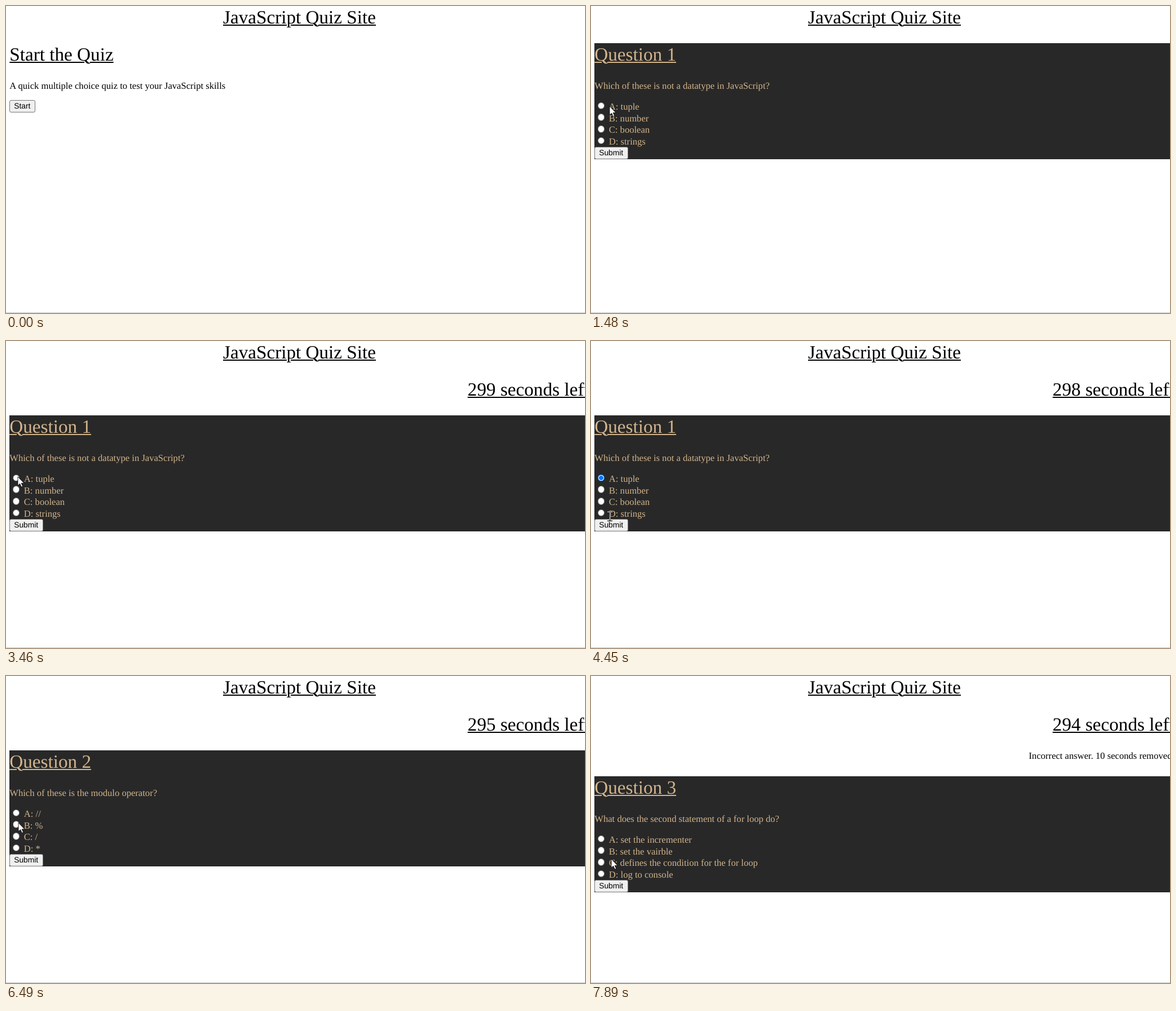
Animation of 1027 by 545 pixels, one loop 8 s. Source, as an HTML page:

```html
<!DOCTYPE html>
<html lang="en">
<head>
<meta charset="utf-8">
<title>JavaScript Quiz Site</title>
<style>
  html, body { margin: 0; width: 100%; height: 100%; overflow: hidden; background: #fff; }
  #stage { position: relative; width: 1027px; height: 545px; overflow: hidden; background: #fff; isolation: isolate; }
  #stage * { position: absolute; box-sizing: border-box; }
  #edge { left: 0; top: 544px; width: 100%; height: 1px; background: #c8c8c8; }
  .text { white-space: pre; color: #000; text-rendering: geometricPrecision; }
  .heading { font: 33.2px/36px "Liberation Serif", "Times New Roman", serif;
    text-decoration: underline 2px; text-underline-offset: 2px; }
  .body { font: 16.6px/19px "Liberation Serif", "Times New Roman", serif; }
  .label { font: 13.8px/15px "Liberation Sans", Arial, sans-serif; }
  .panel { left: 6px; width: 1021px; height: 206px; background: #282828; }
  .tan { color: #d2b48c; }
  .button { left: 6px; height: 22px; border: 1px solid #767676; border-radius: 3px; background: #efefef; }
  .button.hover { background: #e5e5e5; border-color: #4f4f4f; }
  .button.active { background: #f5f5f5; border-color: #8d8d8d; }
  .radio { --blue: #0075ff; left: 11.6px; width: 12.8px; height: 12.8px; border: 1px solid #767676; border-radius: 50%; background: #fff; }
  .radio.hover { --blue: #005cc8; border-color: #4f4f4f; }
  .radio.checked { border: 1.5px solid var(--blue); background: radial-gradient(circle, var(--blue) 3.6px, #fff 4.2px); }
  #glow { left: -12.5px; top: -12.5px; width: 25px; height: 25px; border-radius: 50%; background: rgba(250, 240, 0, .58); }
  #pointer { left: 0; top: 0; overflow: visible; }
</style>
</head>
<body>
<div id="stage">
  <div id="page"></div>
  <div id="edge"></div>
  <div id="glow"></div>
  <svg id="pointer" width="1" height="1">
    <path id="arrow" d="M0 0V15.5L3.6 12.2 6.3 18 8.7 17 6.2 11.4H11Z" fill="#fff" stroke="#000" stroke-width=".8"/>
    <path id="beam" d="M-4.5 -8H4.5M0 -8V8M-4.5 8H4.5" fill="none" stroke="#fff" stroke-width="1.4"/>
  </svg>
</div>
<script>
const LOOP = 8000, STEP = 66, PRESS = 130, SECOND = 1004;
const TIMER_START = 2470, ENTER = 260;
const HEAD = 66, ROW = 20.7;
const $ = id => document.getElementById(id);

// moments at which the mouse button is let go
const clicks = { start: 1480, pickOne: 3850, sendOne: 5060, pickTwo: 6820, sendTwo: 7890 };

const intro = { title: 'Start the Quiz', text: 'A quick multiple choice quiz to test your JavaScript skills', options: [] };
const first = { title: 'Question 1', text: 'Which of these is not a datatype in JavaScript?',
  options: ['tuple', 'number', 'boolean', 'strings'], answer: 0, answered: clicks.pickOne };
const second = { title: 'Question 2', text: 'Which of these is the modulo operator?',
  options: ['//', '%', '/', '*'], answer: 1, answered: clicks.pickTwo };
const third = { title: 'Question 3', text: 'What does the second statement of a for loop do?',
  options: ['set the incrementer', 'set the vairble', 'defines the condition for the for loop', 'log to console'] };

const pages = [
  { at: 0, top: HEAD, quiz: intro },
  { at: clicks.start, top: HEAD, quiz: first },
  { at: TIMER_START, top: 2 * HEAD, quiz: first },
  { at: clicks.sendOne, top: 2 * HEAD, quiz: second },
  { at: clicks.sendTwo, top: 2 * HEAD + 46, quiz: third, wrong: true }
];

const corner = { x: 966, y: 559 };
const submit = { x: 36, y: 325 };
const glides = [
  { from: ENTER, to: 880, x: 195, y: 150 },
  { from: 940, to: 1010, x: 60, y: 137 },
  { from: 1150, to: 1280, x: 33, y: 178 },
  { from: 2010, to: 2210, x: 18, y: 186 },
  { from: 2530, to: 3390, x: 21, y: 241 },
  { from: 4180, to: 4860, ...submit },
  { from: 5130, to: 6020, x: 22, y: 260.5 },
  { from: 6890, to: 7420, ...submit }
];

const easeOut = p => 1 - (1 - p) ** 3;

function pointerAt(t) {
  let { x, y } = corner, moved = 0;
  for (const glide of glides.filter(g => g.from <= t)) {
    const steps = Math.round((glide.to - glide.from) / STEP) + 1;
    const step = Math.min(steps, Math.floor((t - glide.from) / STEP) + 1);
    const p = easeOut(step / steps);
    x += (glide.x - x) * p;
    y += (glide.y - y) * p;
    moved = glide.from;
  }
  return { x, y, moved };
}

const ascent = { heading: 29, body: 15, label: 12 };
const text = (str, x, baseline, kind, tone = '') =>
  `<div class="text ${kind} ${tone}" style="left:${x}px;top:${baseline - ascent[kind]}px">${str}</div>`;

function button(name, top, width, mouse, pressed) {
  const over = mouse.awake && mouse.x > 6 && mouse.x < 6 + width && mouse.y > top && mouse.y < top + 22;
  const state = !over ? '' : pressed ? 'active' : 'hover';
  return `<div class="button ${state}" style="top:${top}px;width:${width}px"></div>`
    + text(name, 14.2, top + 15, 'label');
}

function radio(y, checked, mouse) {
  const over = Math.hypot(mouse.x - 18, mouse.y - y) < 6.5;
  return `<div class="radio ${checked ? 'checked' : ''} ${over ? 'hover' : ''}" style="top:${y - 6.4}px"></div>`;
}

function pageMarkup(t, { top, quiz, wrong }, mouse, pressed) {
  const asking = quiz.options.length > 0;
  const tone = asking ? 'tan' : '';
  let out = text('JavaScript Quiz Site', 385, 32, 'heading');
  if (t >= TIMER_START) {
    const left = 299 - Math.floor((t - TIMER_START) / SECOND);
    out += text(`${left} seconds left`, 818.8, HEAD + 32, 'heading');
  }
  if (wrong) out += text('Incorrect answer. 10 seconds removed.', 776.6, HEAD + 81, 'body');
  if (asking) out += `<div class="panel" style="top:${top}px"></div>`;
  out += text(quiz.title, 6.3, top + 32, 'heading', tone) + text(quiz.text, 6.3, top + 81, 'body', tone);
  quiz.options.forEach((option, i) => {
    const y = top + 111 + ROW * i;
    out += radio(y, i === quiz.answer && t >= quiz.answered, mouse)
      + text(`${'ABCD'[i]}: ${option}`, 31.8, Math.round(y + 7), 'body', tone);
  });
  return out + (asking ? button('Submit', top + 184, 60, mouse, pressed)
    : button('Start', top + 101, 46, mouse, pressed));
}

function overText({ top, quiz }, mouse) {
  const y = mouse.y - top;
  const onLine = Math.abs(y - 75) < 10;
  const onOption = mouse.x > 32 && y > 103 && y < 103 + ROW * quiz.options.length;
  return mouse.awake && (onLine || onOption);
}

let shown = '';
function render(t) {
  const page = pages.filter(p => p.at <= t).pop();
  const mouse = pointerAt(t);
  mouse.awake = mouse.moved > page.at;
  const pressed = Object.values(clicks).some(end => t >= end - PRESS && t < end);
  const beam = overText(page, mouse);
  const markup = pageMarkup(t, page, mouse, pressed);
  if (markup !== shown) $('page').innerHTML = shown = markup;

  $('glow').style.transform = $('pointer').style.transform = `translate(${mouse.x}px, ${mouse.y}px)`;
  $('glow').style.display = pressed ? '' : 'none';
  $('pointer').style.display = t >= ENTER ? '' : 'none';
  $('pointer').style.mixBlendMode = beam ? 'difference' : 'normal';
  $('arrow').style.display = beam ? 'none' : '';
  $('beam').style.display = beam ? '' : 'none';
}

const began = performance.now();
function frame(now) {
  render(Math.max(0, now - began) % LOOP);
  requestAnimationFrame(frame);
}
render(0);
requestAnimationFrame(frame);
</script>
</body>
</html>
```
